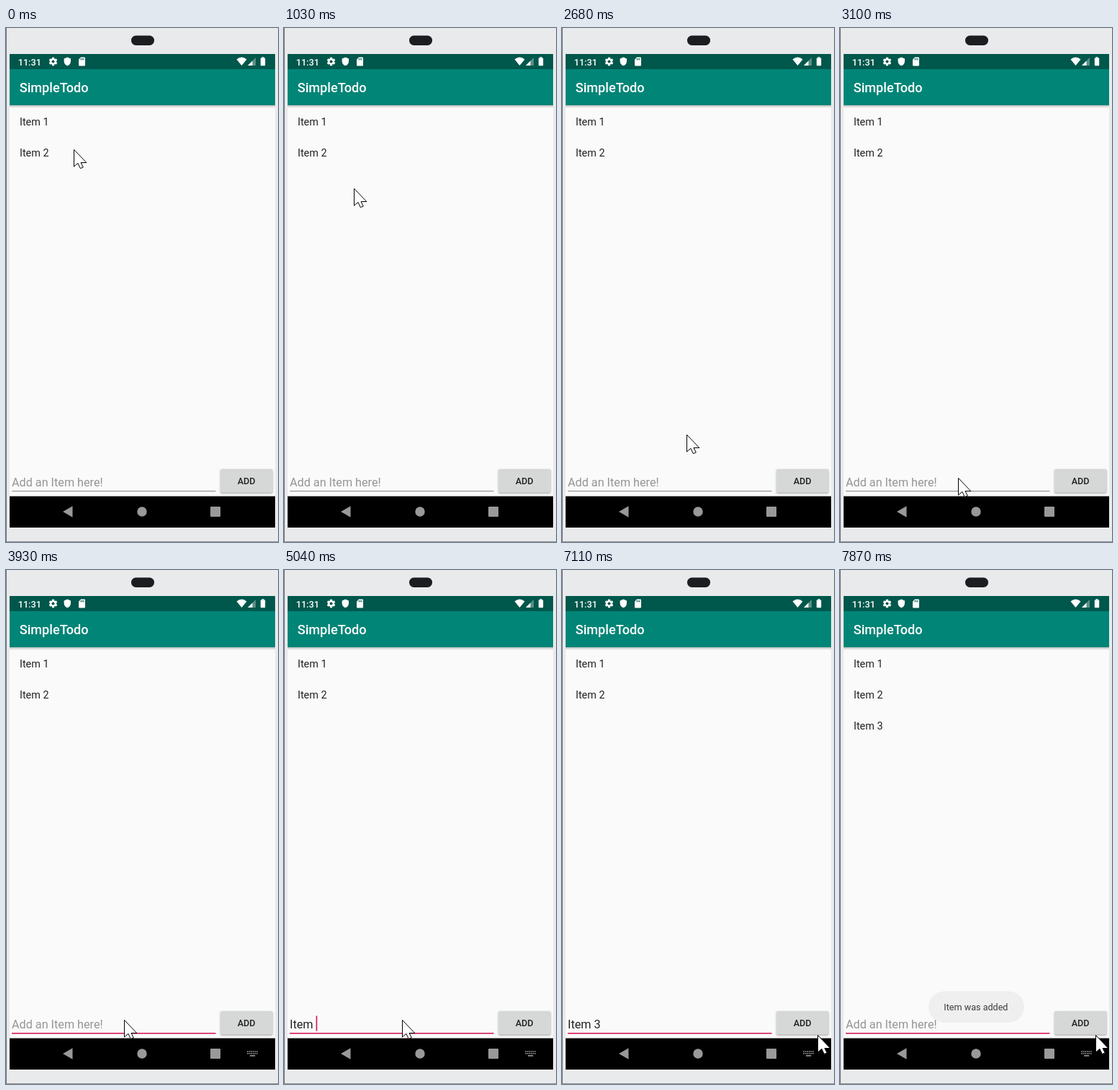
These frames come from a looping animation (378 by 712 pixels, 7.99 s). An HTML page with a canvas:

```html
<!DOCTYPE html>
<html lang="en">
<head>
<meta charset="utf-8">
<title>SimpleTodo</title>
<style>
  html, body { margin: 0; width: 100%; height: 100%; overflow: hidden; background: #e9eaec; }
  canvas { display: block; width: 378px; height: 712px; }
</style>
</head>
<body>
<canvas id="stage"></canvas>
<script>
const W = 378, H = 712, LOOP = 7990;
const ACCENT = '#d81b60', INK = '#212121', STATUS = '#00574b', ICON = '#999';
const canvas = document.getElementById('stage');
const dpr = window.devicePixelRatio || 1;
canvas.width = W * dpr;
canvas.height = H * dpr;
const ctx = canvas.getContext('2d');
ctx.scale(dpr, dpr);

const FOCUS = 3400, ADDED = 7360;
const BLINK = 490;  // caret half period, restarted by every edit
const HOP = 138;

const edits = [
  { t: FOCUS, text: '' },
  { t: 4640, text: 'It' },
  { t: 4770, text: 'Item' },
  { t: 5040, text: 'Item ' },
  { t: 5590, text: 'Item 3' },
  { t: ADDED, text: '' }
];

const home = { x: 94, y: 168 };
const moves = [
  { from: 10, to: 720, x: 64, y: 132 },
  { from: 890, to: 1300, x: 193, y: 480 },
  { from: 1300, to: 1580, x: 160, y: 617 },
  { from: 1720, to: 1860, x: 158, y: 623 },
  { from: 2000, to: 2410, x: 61, y: 167 },
  { from: 2410, to: 2680, x: 173, y: 563 },
  { from: 2680, to: 3100, x: 164, y: 623 },
  { from: 6010, to: 6560, x: 360, y: 644 },
  { from: 6560, to: 6830, x: 355, y: 644 }
];

const clamp = v => Math.min(1, Math.max(0, v));
const smooth = v => v * v * (3 - 2 * v);

function pointerAt(t) {
  let { x, y } = home;
  for (const m of moves) {
    const hops = Math.round((m.to - m.from) / HOP);
    const p = clamp((t - m.from) / (m.to - m.from));
    const k = smooth(Math.floor(p * hops + 1e-6) / hops);
    x += (m.x - x) * k;
    y += (m.y - y) * k;
  }
  return [Math.round(x), Math.round(y)];
}

function rect(x, y, w, h, color) {
  ctx.fillStyle = color;
  ctx.fillRect(x, y, w, h);
}

function round(x, y, w, h, r, color) {
  ctx.fillStyle = color;
  ctx.beginPath();
  ctx.roundRect(x, y, w, h, r);
  ctx.fill();
}

function disc(x, y, r, color) {
  ctx.fillStyle = color;
  ctx.beginPath();
  ctx.arc(x, y, r, 0, Math.PI * 2);
  ctx.fill();
}

function shape(d, color) {
  ctx.fillStyle = color;
  ctx.fill(new Path2D(d));
}

function label(str, x, y, size, color, weight = 400) {
  ctx.font = `${weight} ${size}px Roboto, sans-serif`;
  ctx.fillStyle = color;
  ctx.fillText(str, x, y);
  return ctx.measureText(str).width;
}

function gear(x, y) {
  for (let i = 0; i < 6; i++) {
    ctx.save();
    ctx.translate(x, y);
    ctx.rotate(i * Math.PI / 3);
    rect(-1.6, -5.8, 3.2, 3, '#fff');
    ctx.restore();
  }
  disc(x, y, 4.4, '#fff');
  disc(x, y, 2, STATUS);
}

function statusBar() {
  rect(5, 36, 369, 21, STATUS);
  label('11:31', 16.7, 51.5, 12.7, '#fff', 500);
  gear(65.5, 46.5);
  shape('M85.3 40.5l4.7 2v3.4c0 3-2 5.6-4.7 6.4c-2.7-.8-4.7-3.4-4.7-6.4v-3.4z', '#fff');
  shape('M104 40.5h5q1 0 1 1v10q0 1-1 1h-7q-1 0-1-1v-7.7z', '#fff');
  for (let i = 0; i < 3; i++) rect(103.6 + i * 1.9, 42, 1, 2.4, STATUS);
  shape('M320.5 43.4q7-5.6 14 0l-7 8.6z', '#fff');
  shape('M347 41v11h-11z', '#5c8f87');
  shape('M342.5 45.5v6.5h-6.5z', '#fff');
  round(353.8, 41.4, 6.4, 10.8, 0.8, '#fff');
  rect(355.4, 40.2, 3.2, 1.5, '#fff');
}

function appBar() {
  const fade = ctx.createLinearGradient(0, 107, 0, 111);
  fade.addColorStop(0, 'rgba(0,0,0,.24)');
  fade.addColorStop(1, 'rgba(0,0,0,0)');
  rect(5, 107, 369, 4, fade);
  rect(5, 57, 369, 50, '#008577');
  label('SimpleTodo', 18.8, 89.4, 18.1, '#fff', 500);
}

function navBar(focused) {
  rect(5, 648.6, 369, 43.4, '#000');
  shape('M79 670l13.5-7.7v15.4z', ICON);
  disc(189, 670, 6.7, ICON);
  round(284, 663, 14, 14, 1, ICON);
  if (!focused) return;
  for (let row = 0; row < 2; row++)
    for (let i = 0; i < 6; i++) rect(335.2 + i * 2.55, 666.2 + row * 2.8, 1.6, 1.6, ICON);
  rect(339, 672, 7.2, 1.6, ICON);
}

function field(t) {
  const edit = edits.findLast(e => e.t <= t);
  const text = edit ? edit.text : '';
  const width = text && label(text, 8, 634.5, 16.2, INK);
  if (!text) label('Add an Item here!', 8, 634.5, 16.2, '#959595');
  rect(8, 641, 283.5, edit ? 1.6 : 1, edit ? ACCENT : '#858585');
  if (edit && Math.floor((t - edit.t) / BLINK) % 2 === 0) rect(8 + (width || 0), 617.5, 1.7, 21, ACCENT);
}

function addButton(t) {
  const ripple = t < ADDED ? 0 : 1 - clamp((t - ADDED) / 350);
  ctx.save();
  ctx.shadowColor = 'rgba(0,0,0,.32)';
  ctx.shadowBlur = (2.5 + 2.5 * ripple) * dpr;
  ctx.shadowOffsetY = (1.2 + ripple) * dpr;
  round(298, 611, 72.5, 32.5, 2, '#d6d7d7');
  ctx.restore();
  round(298, 611, 72.5, 32.5, 2, `rgba(0,0,0,${0.12 * ripple})`);
  label('ADD', 321.7, 632.3, 12.6, INK, 500);
}

function toast(t) {
  ctx.save();
  ctx.globalAlpha = clamp((t - 7500) / 370);
  round(123, 583.5, 133, 43.5, 21.7, '#efefef');
  label('Item was added', 144.3, 610, 12.6, '#3c3c3c');
  ctx.restore();
}

function arrow(x, y) {
  ctx.save();
  ctx.translate(x + 0.5, y + 0.5);
  const p = new Path2D('M0 0V23.5L5.4 18.8L8.8 26L12.8 24.4L9.5 18H17.3Z');
  ctx.fillStyle = '#fff';
  ctx.fill(p);
  ctx.strokeStyle = '#000';
  ctx.lineWidth = 1;
  ctx.stroke(p);
  ctx.restore();
}

function draw(t) {
  rect(0, 0, W, H, '#e9eaec');
  rect(0, 0, 1, H, '#76777a');
  rect(0, 711, W, 1, '#8b8c8f');
  round(174, 10.5, 32, 13.5, 6.5, '#1c1d21');
  rect(5, 57, 369, 592, '#fafafa');
  statusBar();
  appBar();

  const count = t >= ADDED ? 3 : 2;
  for (let i = 0; i < count; i++) label('Item ' + (i + 1), 19, 135 + i * 43, 14.4, INK);

  field(t);
  addButton(t);
  navBar(t >= FOCUS);
  toast(t);
  arrow(...pointerAt(t));
}

const start = performance.now();
function tick() {
  draw((performance.now() - start) % LOOP);
  requestAnimationFrame(tick);
}
tick();
</script>
</body>
</html>
```
